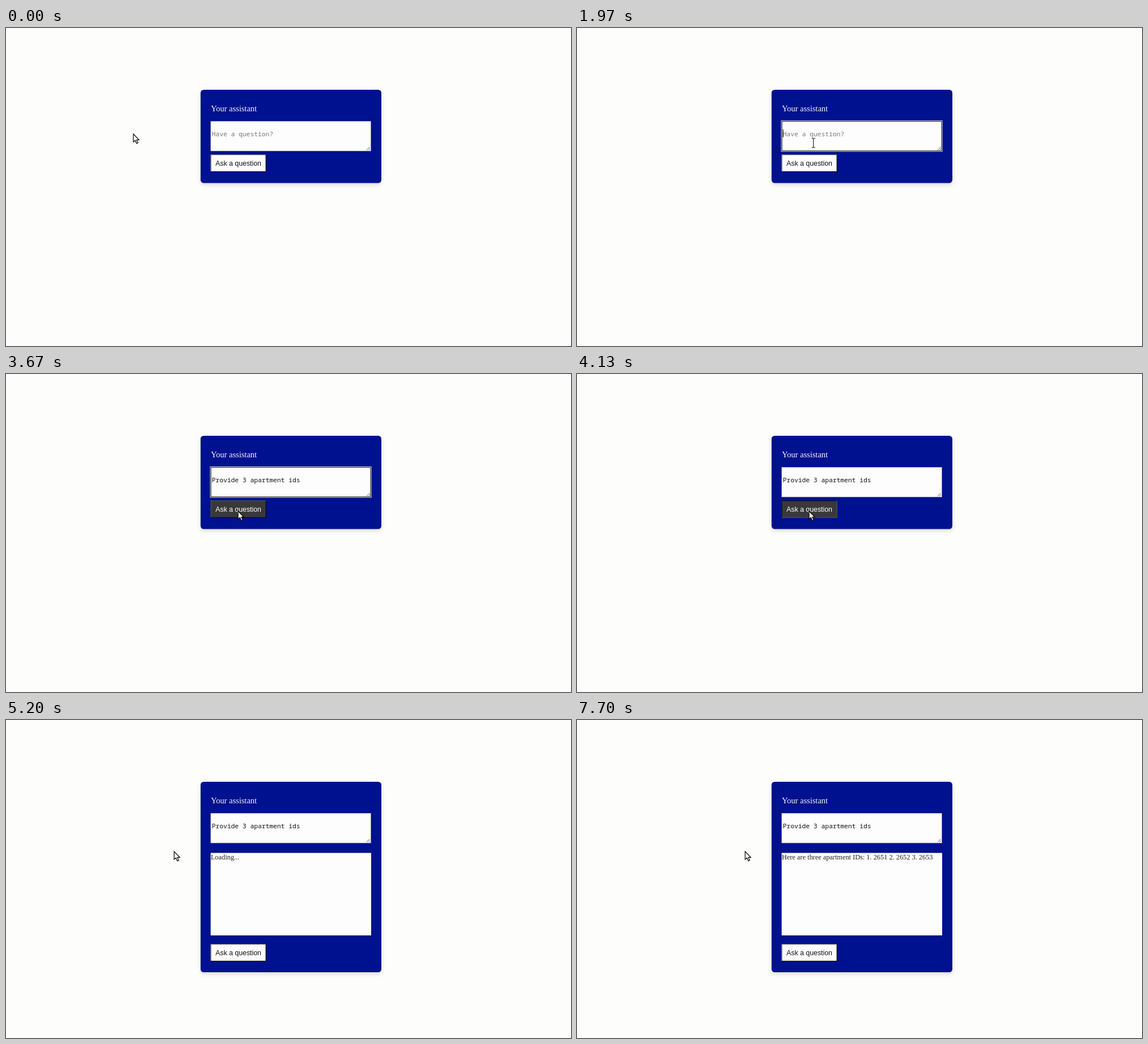
An HTML page that plays this animation: 998x561 px, repeating every 8000 ms.

```html
<!DOCTYPE html>
<html lang="en">
<head>
<meta charset="utf-8">
<title>Your assistant</title>
<style>
  html, body { margin: 0; width: 100%; height: 100%; overflow: hidden; background: #fdfdfc; }
  svg { display: block; width: 100vw; height: 100vh; }
  text { white-space: pre; }
  .card { fill: #00118f; filter: drop-shadow(0 3.5px 3.6px rgba(0, 0, 0, .14)); }
  .panel { fill: #fdfdfd; }
  .title { font: 14.5px "Liberation Serif", serif; fill: #f4f4fa; }
  .mono { font: 11.3px "Noto Sans Mono", monospace; }
  .reply { font: 12.34px "Liberation Serif", serif; fill: #222; }
  .label { font: 12.35px "Liberation Sans", sans-serif; }
</style>
</head>
<body>
<svg viewBox="0 0 998 561">
  <rect id="card" class="card" x="343.7" y="109" width="319.3" rx="5.5"/>
  <text class="title" x="362" y="147">Your assistant</text>

  <rect class="panel" x="361.5" y="164.5" width="283" height="52.5" stroke="#8a8aa0" stroke-width=".6"/>
  <g id="ring" fill="none">
    <rect x="361" y="163.7" width="284" height="54" stroke="#fff"/>
    <rect x="362" y="164.7" width="282" height="52" stroke="#101010"/>
  </g>
  <path d="M637 215.5l5.5-5.5M640.5 215.5l2.5-2.5" stroke="#555" fill="none"/>
  <text id="question" class="mono" x="363.6" y="190.7"></text>
  <path id="caret" d="M0 179v14" stroke="#000"/>

  <g id="answer">
    <rect class="panel" x="361.5" y="234.5" width="283.5" height="145.5"/>
    <text id="reply" class="reply" x="361.8" y="246"></text>
  </g>

  <g id="button">
    <rect id="face" x="361.5" y="223.3" width="98" height="30.4"/>
    <path id="lit" d="M362 253.7v-30h97.5" fill="none"/>
    <path id="shade" d="M361.5 253.4h97.7v-30" fill="none" stroke-width="1.4"/>
    <text id="label" class="label" x="370" y="242.8">Ask a question</text>
  </g>

  <path id="arrow" d="M0 0v14l3.2-2.8 2.5 5.6 2.4-1.1-2.4-5.4h4.3z"
        fill="#fff" stroke="#000" stroke-width="1.2"/>
  <path id="beam" d="M-3-8h2.5l.5 1 .5-1H3M0-7V7M-3 8h2.5l.5-1 .5 1H3" fill="none" stroke="#000"/>
</svg>
<script>
const LOOP = 8000;
const FOCUS = 1730, PASTE = 2170, PRESS = 3970, RELEASE = 4200, ANSWER = 5500;
const GROWTH = 172;

// Pointer stops: time, x, y
const stops = [
  [970, 225, 187], [1700, 473, 201], [1870, 473, 201], [2170, 263, 208],
  [2670, 410, 246], [2780, 410, 246], [3130, 410, 242], [RELEASE, 410, 242], [4490, 297, 232]
];

const $ = id => document.getElementById(id);
const set = (id, attrs) => {
  for (const name in attrs) $(id).setAttribute(name, attrs[name]);
};
const show = (id, visible) => set(id, { visibility: visible ? "visible" : "hidden" });
const within = (t, from, to) => t >= from && t < to;

function pointerAt(t) {
  const next = stops.findIndex(stop => stop[0] > t);
  if (next < 1) return stops.at(next).slice(1);
  const [t0, x0, y0] = stops[next - 1], [t1, x1, y1] = stops[next];
  const u = (t - t0) / (t1 - t0), k = u * u * (3 - 2 * u);
  return [x0 + (x1 - x0) * k, y0 + (y1 - y0) * k];
}

function draw(t) {
  const [x, y] = pointerAt(t);
  const filled = t >= PASTE, open = t >= RELEASE;
  const overField = within(x, 362, 645) && within(y, 165, 217);
  const pressed = within(t, PRESS, RELEASE);
  const hovered = !open && within(x, 362, 460) && within(y, 223, 254);

  set("card", { height: 164.5 + (open ? GROWTH - .5 : 0) });
  $("question").textContent = filled ? "Provide 3 apartment ids" : "Have a question?";
  set("question", { fill: filled ? "#111" : "#777" });
  show("ring", within(t, FOCUS, PRESS));
  show("caret", within(t, FOCUS, 2670) || within(t, 3130, 3670));
  set("caret", { transform: `translate(${filled ? 520.2 : 364} 0)` });

  show("answer", open);
  $("reply").textContent = t < ANSWER
    ? "Loading..." : "Here are three apartment IDs: 1. 2651 2. 2652 3. 2653";

  set("button", { transform: `translate(0 ${open ? GROWTH : 0})` });
  set("face", { fill: hovered ? "#393939" : "#fdfdfd" });
  set("lit", { stroke: pressed ? "#0a0a0a" : hovered ? "#555" : "#55556a" });
  set("shade", { stroke: pressed ? "#4c4c4c" : "#0a0a0a" });
  set("label", { fill: hovered ? "#fff" : "#111" });

  for (const id of ["arrow", "beam"]) set(id, { transform: `translate(${x} ${y})` });
  show("arrow", !overField);
  show("beam", overField);
}

const start = performance.now();
function tick() {
  draw((performance.now() - start) % LOOP);
  requestAnimationFrame(tick);
}
tick();
</script>
</body>
</html>
```
